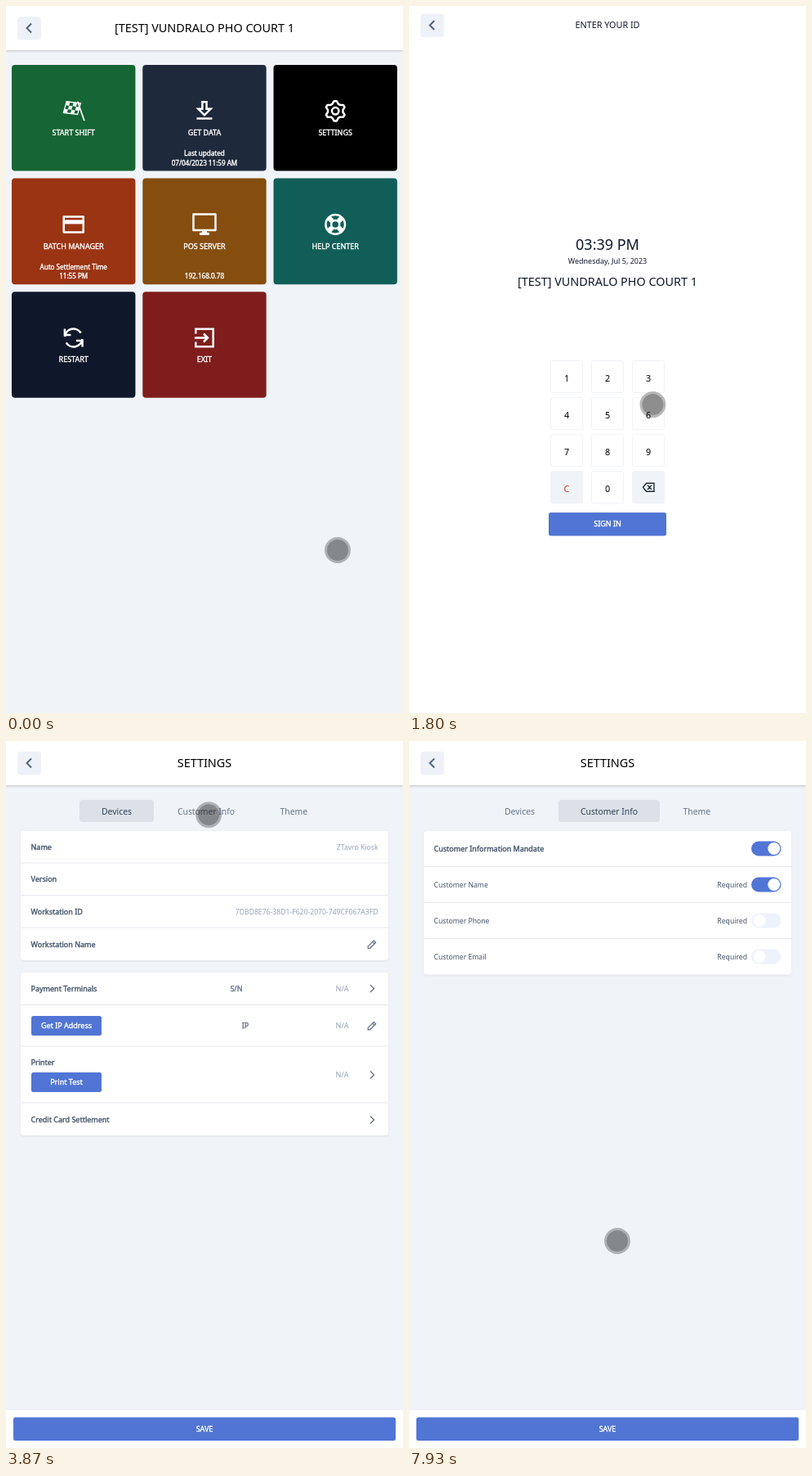
Write an HTML page that moves like this. It is 486 px wide and 864 px high and loops after 8000 ms.

```html
<!DOCTYPE html>
<html lang="en">
<head>
<meta charset="utf-8">
<title>Kiosk settings</title>
<style>
  html, body { margin: 0; width: 100%; height: 100%; overflow: hidden; background: #f0f4f9; }
  svg { display: block; width: 100%; height: 100%; font-family: "Noto Sans", "Open Sans", sans-serif; }
  text { white-space: pre; }
  .line { fill: none; stroke: #fff; stroke-width: 2.5; }
  .bar { filter: drop-shadow(0 1px 1.5px rgba(0,0,0,.2)); }
  .card { filter: drop-shadow(0 1px 1px rgba(0,0,0,.07)); }
  .sheet { filter: drop-shadow(0 -3px 6px rgba(0,0,0,.2)); }
  .popup { filter: drop-shadow(0 5px 8px rgba(0,0,0,.4)); }
</style>
</head>
<body>
<svg id="stage" viewBox="0 0 486 864" xmlns="http://www.w3.org/2000/svg"></svg>
<script>
const BLUE = '#5175d4', SLATE = '#475569', MUTED = '#94a3b8', PAGE = '#f0f4f9';
const SHOP = '[TEST] VUNDRALO PHO COURT 1';

// ---- drawing helpers ----
const rect = (x, y, w, h, r, fill, extra = '') =>
  `<rect x="${x}" y="${y}" width="${w}" height="${h}" rx="${r}" fill="${fill}" ${extra}/>`;
const group = (id, body, extra = '') => `<g id="${id}" ${extra}>${body}</g>`;
const text = (x, middle, size, str, fill = '#000', anchor = 'middle', bold = false, id = '') =>
  `<text x="${x}" y="${middle + size * .357}" font-size="${size}" fill="${fill}" text-anchor="${anchor}"` +
  (bold ? ` stroke="${fill}" stroke-width=".375"` : '') + (id ? ` id="${id}"` : '') + `>${str}</text>`;
const stroke = (d, color, width, extra = '') =>
  `<path d="${d}" fill="none" stroke="${color}" stroke-width="${width}" ${extra}/>`;
const white = (d, extra = '') => `<path class="line" d="${d}" ${extra}/>`;

const backButton = y => rect(14, y - 14, 29, 28.5, 4, '#eef2f8') +
  stroke(`M31 ${y - 5.5}l-5.5 5.5 5.5 5.5`, '#526580', 2);
const header = title => rect(0, 0, 486, 54, 0, '#fff', 'class="bar"') + backButton(27) + text(243, 27, 14.4, title);
const button = (x, y, w, h, label) => rect(x, y, w, h, 2.5, BLUE) +
  text(x + w / 2, y + h / 2, 9, label, '#fff', 'middle', true);
const card = (top, bottom, lines) => rect(18, top, 450, bottom - top, 4, '#fff', 'class="card"') +
  lines.map(y => rect(18, y - .5, 450, 1, 0, '#e5e8ee')).join('');
const chevron = y => stroke(`M446 ${y - 4.5}l4.5 4.5-4.5 4.5`, '#64748b', 1.4);
const pencil = y => `<path transform="translate(448 ${y})" fill="none" stroke="#64748b" stroke-width="1.3"
  d="M-4.8 4.8v-2.4l7-7 2.4 2.4-7 7zM.6-3l2.4 2.4"/>`;

// ---- home icons, each centred on 0,0 ----
function gear() {
  const points = [];
  for (let i = 0; i < 24; i++) {
    const r = i % 4 < 2 ? 12.2 : 9.3, a = (i - .5) * Math.PI / 12 - Math.PI / 2;
    points.push(`${(r * Math.cos(a)).toFixed(1)} ${(r * Math.sin(a)).toFixed(1)}`);
  }
  return white(`M${points.join('L')}z`, 'stroke-linejoin="round"') + '<circle class="line" r="4.2"/>';
}
function flag() {
  let squares = '';
  for (let i = 0; i < 12; i++) {
    const col = i % 4, row = i >> 2;
    if ((col + row) % 2 === 0) squares += rect(col * 4.4, row * 4.6, 4.4, 4.6, 0, '#fff');
  }
  return `<g transform="matrix(.98 .12 -.28 .98 -8.5 -11.5)">${squares}
    <rect width="17.6" height="13.8" fill="none" stroke="#fff" stroke-width="1.3"/></g>` +
    stroke('M5-11.5L13.2 12', '#fff', 1.7);
}
const icons = {
  flag: flag(),
  download: white('M-2.6-11h5.2v8.5h5L0 5l-7.6-7.5h5zM-9.5 9.3h19'),
  gear: gear(),
  card: white('M-12-9.5h24v19h-24z', 'stroke-linejoin="round"') + rect(-12, -5.5, 24, 5, 0, '#fff'),
  monitor: white('M-13.5-12.5h27v19.5h-27z', 'stroke-linejoin="round"') + rect(-3, 7, 6, 4, 0, '#fff') + rect(-6, 10, 12, 3, 0, '#fff'),
  help: '<circle class="line" r="11.8"/><circle class="line" r="5"/>' +
    `<g stroke-width="6">${stroke('M-4-4l-4-4M4-4l4-4M-4 4l-4 4M4 4l4 4', '#fff', 6)}</g>`,
  restart: white('M-10.7-1.5A10.7 10.7 0 0 1 9-6M10.7 1.5A10.7 10.7 0 0 1-9 6M-10.8-11v7.5h7.5M10.8 11v-7.5h-7.5'),
  exit: white('M-10.7-5v-5.7h21.4v21.4h-21.4V5M-12 0H4M-1-5l5 5-5 5')
};

const tiles = [
  ['START SHIFT', '#166534', 'flag'],
  ['GET DATA', '#1e293b', 'download', 'Last updated', '07/04/2023 11:59 AM'],
  ['SETTINGS', '#000', 'gear'],
  ['BATCH MANAGER', '#9a3412', 'card', 'Auto Settlement Time', '11:55 PM'],
  ['POS SERVER', '#854d0e', 'monitor', '', '192.168.0.78'],
  ['HELP CENTER', '#115e59', 'help'],
  ['RESTART', '#0f172a', 'restart'],
  ['EXIT', '#7f1d1d', 'exit']
];
const home = header(SHOP) + tiles.map(([label, color, icon, note = '', detail = ''], i) => {
  const x = 7 + i % 3 * 160.25, y = 72 + Math.floor(i / 3) * 138.6, mid = x + 75.7;
  return rect(x, y, 151.4, 129.6, 4, color) +
    `<g transform="translate(${mid} ${y + 56.3})">${icons[icon]}</g>` +
    text(mid, y + 83, 9, label, '#fff', 'middle', true) +
    text(mid, y + 108.3, 8.1, note, '#fff', 'middle', true) +
    text(mid, y + 120, 8.1, detail, '#fff', 'middle', true);
}).join('');

// ---- settings ----
const label = (y, str) => text(30.5, y, 9, str, SLATE, 'start', true);
const value = (x, y, str, size = 8.64) => text(x, y, size, str, MUTED, 'end');
const devices = card(110, 268, [149, 188.5, 228]) +
  label(130, 'Name') + value(455.5, 130, 'ZTavro Kiosk') +
  label(169, 'Version') +
  label(209, 'Workstation ID') + value(455.5, 209, '7DBD8E76-38D1-F620-2070-749CF067A3FD') +
  label(248.5, 'Workstation Name') + pencil(248.5) +
  card(283, 482, [322.5, 373, 442]) +
  label(302.5, 'Payment Terminals') + text(282, 302.5, 9, 'S/N', '#64748b', 'middle', true) +
  value(419.5, 302.5, 'N/A', 9) + chevron(302.5) +
  button(31, 336, 86, 24, 'Get IP Address') + text(293, 348, 9, 'IP', '#64748b', 'middle', true) +
  value(419.5, 348, 'N/A', 9) + pencil(348) +
  label(393, 'Printer') + button(31, 405, 86, 24, 'Print Test') + value(419.5, 408, 'N/A', 9) + chevron(408) +
  label(463, 'Credit Card Settlement') + chevron(463);

const toggle = (id, y) => rect(419, y - 9, 36.5, 18, 9, '#edf2fd', `id="${id}"`) +
  `<circle id="${id}Knob" cx="429" cy="${y}" r="7.5" fill="#fff"/>`;
const customer = card(110, 285.5, [153.5, 197.5, 241.5]) +
  label(131.5, 'Customer Information Mandate') + toggle('mandate', 131.5) +
  ['Name', 'Phone', 'Email'].map((field, i) => {
    const y = 175.5 + i * 44;
    return text(30.5, y, 8.64, 'Customer ' + field, SLATE, 'start') +
      text(414, y, 8.64, 'Required', SLATE, 'end') + toggle('ask' + field, y);
  }).join('');

const settings = rect(0, 0, 486, 864, 0, PAGE) + header('SETTINGS') + group('content',
  rect(90, 72, 91, 27, 4, '#dce1e8', 'id="pill"') +
  text(135.5, 86, 10.35, 'Devices', SLATE, 'middle', false, 'tabDevices') +
  text(245, 86, 10.35, 'Customer Info', SLATE, 'middle', false, 'tabCustomer') +
  text(352.3, 86, 10.35, 'Theme', '#64748b') +
  `<g clip-path="url(#pane)">${group('devices', devices)}${group('customer', customer)}</g>` +
  rect(0, 817, 486, 47, 0, '#fff', 'class="card"') + rect(0, 816.5, 486, 1, 0, '#e9edf2') +
  group('save', button(9, 826.5, 468, 28.5, 'SAVE')));

// ---- sign-in sheet ----
const keypad = [...'123456789C0<'].map((key, i) => {
  const x = 173.5 + i % 3 * 50, y = 433.5 + Math.floor(i / 3) * 45.1, special = i === 9 || i === 11;
  const face = key === '<'
    ? stroke(`M${x + 13} ${y + 19.5}l4-5h9.5v10h-9.5zM${x + 18.5} ${y + 17}l5 5m0-5l-5 5`, '#1e293b', 1.4)
    : text(x + 19.5, y + 21.5, 10.8, key, key === 'C' ? '#c2410c' : '#000');
  return rect(x, y, 39, 39, 2, special ? '#f0f4f9' : '#fff', 'stroke="#f0f2f6"') + face;
}).join('');
const sheet = rect(0, 0, 486, 870, 0, '#fff', 'class="sheet"') + backButton(23.5) +
  text(243, 23.5, 10.8, 'ENTER YOUR ID', '#0f172a') +
  text(243, 292, 18, '03:39 PM', '#0f172a') +
  text(243, 312, 9, 'Wednesday, Jul 5, 2023', '#0f172a') +
  text(243, 337, 14.4, SHOP, '#0f172a') +
  `<circle id="digit" cx="243" cy="403" r="3.8" fill="${BLUE}"/>` +
  keypad + button(171, 619, 144, 28.5, 'SIGN IN');

const loader = rect(0, 0, 486, 864, 0, 'rgba(128,128,128,.38)') +
  rect(198, 395, 90, 74, 4, '#fff', 'class="popup"') +
  [0, 1, 2].map(i => `<circle id="beat${i}" cx="${234 + i * 9}" cy="431" fill="#4a70d6"/>`).join('');

document.getElementById('stage').innerHTML =
  '<clipPath id="pane"><rect x="7" y="104" width="472" height="400"/></clipPath>' +
  rect(0, 0, 486, 864, 0, PAGE) + group('home', home) + group('settings', settings) +
  rect(0, 0, 486, 864, 0, '#000', 'id="backdrop"') + group('sheet', sheet) + group('loader', loader) +
  group('cursor', '<circle r="16" fill="#000" fill-opacity=".27"/><circle r="13" fill="#000" fill-opacity=".235"/>');

// ---- motion ----
const $ = id => document.getElementById(id);
const set = (id, name, v) => $(id).setAttribute(name, v);
const show = (id, on) => set(id, 'visibility', on ? 'visible' : 'hidden');
const ramp = (t, start, length) => Math.min(1, Math.max(0, (t - start) / length));
const smooth = p => p * p * (3 - 2 * p);
const easeOut = p => 1 - (1 - p) ** 3;

// time, x, y
const path = [
  [70, 406, 665], [420, 403, 150], [620, 402, 138], [933, 334, 255], [1500, 300, 480], [2200, 296, 498],
  [2467, 325, 488], [2580, 262, 628], [2720, 256, 630], [3200, 316, 321], [3700, 250, 92], [4050, 246, 88],
  [4330, 345, 290], [4667, 435, 151], [4950, 437, 143], [5200, 438, 161], [5530, 440, 225], [5670, 440, 225],
  [5870, 421, 212], [6130, 458, 200], [6330, 438, 188], [6600, 438, 187], [6800, 443, 184], [7270, 340, 369],
  [7400, 379, 520], [7600, 310, 828], [7750, 217, 770], [7933, 255, 611]
];
function cursorAt(t) {
  const i = path.findIndex(p => p[0] > t);
  if (i < 1) return (i ? path[path.length - 1] : path[0]).slice(1);
  const [a, b] = [path[i - 1], path[i]], k = smooth(ramp(t, a[0], b[0] - a[0]));
  return [1, 2].map(n => a[n] + (b[n] - a[n]) * k);
}
function flip(id, t, start) {
  const k = smooth(ramp(t, start, 150));
  set(id, 'fill', `color-mix(in srgb, ${BLUE} ${k * 100}%, #edf2fd)`);
  $(id).style.fill = `color-mix(in srgb, ${BLUE} ${k * 100}%, #edf2fd)`;
  set(id + 'Knob', 'cx', 429 + 17.8 * k);
}

function draw(t) {
  show('home', t < 640);
  show('settings', t >= 640);
  $('content').style.display = t > 2650 ? '' : 'none';

  const opened = easeOut(ramp(t, 809, 500)) - ramp(t, 2700, 300) ** 2;
  set('sheet', 'transform', `translate(0 ${864 * (1 - opened)})`);
  show('sheet', opened > 0);
  set('backdrop', 'opacity', .5 * opened);
  show('digit', t > 2200);

  const busy = ramp(t, 2540, 130) - ramp(t, 3310, 110);
  set('loader', 'opacity', busy);
  for (let i = 0; i < 3; i++) {
    const wave = .5 + .5 * Math.cos((t - 3030 - i * 160) / 1000 * Math.PI * 2);
    set('beat' + i, 'r', 1.2 + 3.2 * Math.min(1, wave * 1.35 * (i === 2 && t < 3260 ? .3 : 1)));
  }
  const ready = .6 + .4 * ramp(t, 3300, 110);
  set('devices', 'opacity', ready);
  set('save', 'opacity', ready);

  const second = t >= 4000;
  set('pill', 'x', second ? 183 : 90);
  set('pill', 'width', second ? 124 : 91);
  set('tabDevices', 'fill', second ? '#64748b' : '#334155');
  set('tabCustomer', 'fill', second ? '#334155' : '#64748b');
  const slide = 472 * easeOut(ramp(t, 4000, 380));
  set('devices', 'transform', `translate(${-slide} 0)`);
  set('customer', 'transform', `translate(${472 - slide} 0)`);
  flip('mandate', t, 4930);
  flip('askName', t, 6730);

  set('cursor', 'transform', `translate(${cursorAt(t).join(' ')})`);
}

const STEP = 1000 / 15, begin = performance.now();
function tick() {
  const t = (performance.now() - begin) % 8000;
  draw(Math.floor((t + 4) / STEP) * STEP % 8000);
  requestAnimationFrame(tick);
}
draw(0);
requestAnimationFrame(tick);
</script>
</body>
</html>
```
